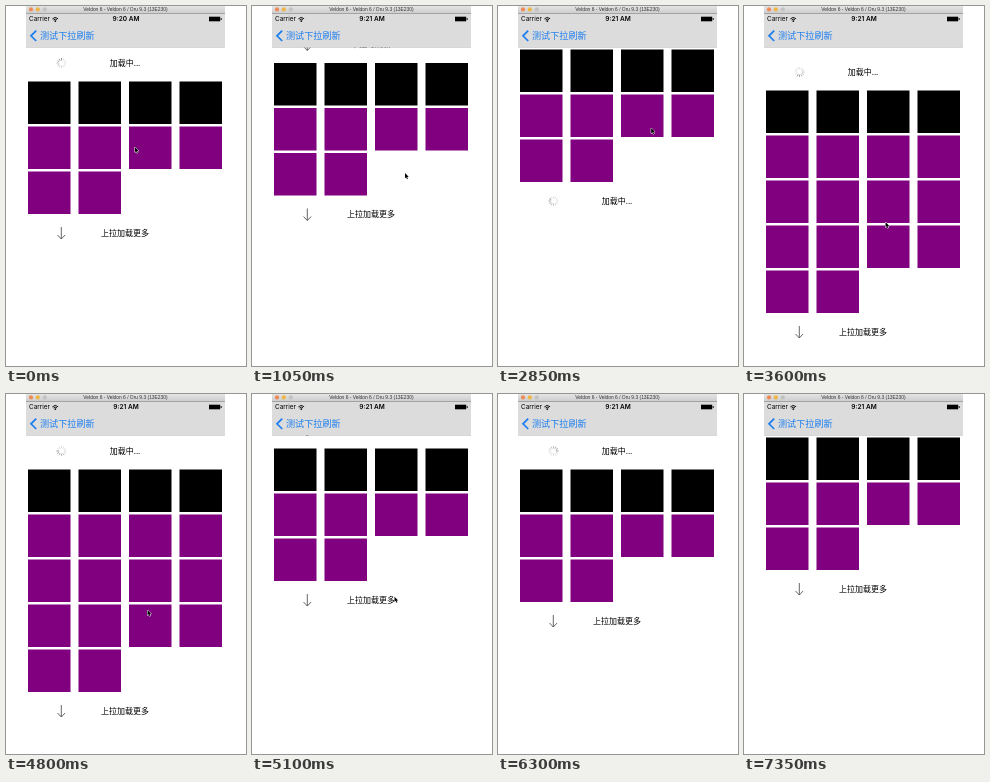
Recreate the animation shown at these times as an HTML page with a canvas. Size 240 by 360 pixels, loop 7500 ms.

```html
<!DOCTYPE html>
<html lang="zh-CN">
<head>
<meta charset="utf-8">
<style>
html, body { margin: 0; width: 100%; height: 100%; overflow: hidden; background: #fff; }
canvas { display: block; width: 240px; height: 360px; }
</style>
</head>
<body>
<canvas id="stage"></canvas>
<script>
const LOOP = 7500, STEP = 150;
const canvas = document.getElementById('stage');
const ctx = canvas.getContext('2d');
const dpr = window.devicePixelRatio || 1;
canvas.width = 240 * dpr;
canvas.height = 360 * dpr;

const CJK = '"Noto Sans CJK SC", "Noto Sans CJK", "Noto Sans", sans-serif';
const LATIN = '"Liberation Sans", sans-serif';
const UI = 'Inter, sans-serif';

// [time, pull distance]
const pullKeys = [
  [0, 32], [900, 32], [1050, 13.5], [1200, 3], [1350, 0], [1500, 0],
  [2100, -22], [2250, -10], [2400, 0], [3000, 0], [3150, 5], [3450, 41],
  [3600, 41], [3750, 35], [3900, 32], [4950, 32], [5100, 11], [5250, 3],
  [5550, 27.5], [5850, 40], [6000, 37], [6150, 32], [6750, 32],
  [6900, 13.5], [7050, 3], [7200, 0]
];
// [time, x, y] of the pointer tip
const pointerKeys = [
  [0, 129, 141], [450, 129, 141], [1050, 153, 167], [1500, 153, 167],
  [2100, 153.2, 122], [2850, 153.2, 122], [3150, 145, 142],
  [3450, 141.5, 216], [4800, 141.5, 216], [5250, 143, 196],
  [5550, 143, 240.5], [5850, 143, 264], [6000, 142, 250], [6300, 100, -12]
];

function at(keys, t, i = 1) {
  const n = keys.findIndex(k => k[0] > t);
  if (n < 0) return keys[keys.length - 1][i];
  const a = keys[n - 1], b = keys[n];
  return a[i] + (b[i] - a[i]) * (t - a[0]) / (b[0] - a[0]);
}

const within = (t, a, b) => t >= a && t < b;

function text(str, x, y, size, family, color = '#000', align = 'center', weight = 400) {
  ctx.font = `${weight} ${size}px ${family}`;
  ctx.textAlign = align;
  ctx.fillStyle = color;
  ctx.fillText(str, x, y + size * 0.37);
}

function line(points, color, width) {
  ctx.beginPath();
  points.forEach(([x, y]) => ctx.lineTo(x, y));
  ctx.strokeStyle = color;
  ctx.lineWidth = width;
  ctx.stroke();
}

function dot(x, y, r, color) {
  ctx.beginPath();
  ctx.arc(x, y, r, 0, Math.PI * 2);
  ctx.fillStyle = color;
  ctx.fill();
}

function arrow(x, y, dir) {
  line([[x, y - 6 * dir], [x, y + 6 * dir]], '#555', 0.9);
  line([[x - 3.8, y + 2 * dir], [x, y + 6 * dir], [x + 3.8, y + 2 * dir]], '#555', 0.9);
}

function spinner(x, y, t) {
  const head = Math.floor(t / 1000 * 12);
  for (let i = 0; i < 12; i++) {
    const a = i * Math.PI / 6 - Math.PI / 2;
    const age = ((head - i) % 12 + 12) % 12;
    const alpha = Math.max(0.2, 0.65 - age * 0.07);
    const c = Math.cos(a), s = Math.sin(a);
    line([[x + c * 2.6, y + s * 2.6], [x + c * 5, y + s * 5]], `rgba(80,80,80,${alpha})`, 0.9);
  }
}

function hint(y, t, loading, label, dir) {
  if (loading) spinner(55.5, y, t);
  else arrow(55.3, y, dir);
  text(loading ? '加载中...' : label, 119, y, 8, CJK);
}

function drawList(t) {
  const pull = at(pullKeys, t);
  const top = 43.5 + pull;
  const rows = within(t, 3000, 4950) ? 5 : 3;
  const refreshing = t < 900 || within(t, 3600, 4950) || within(t, 6000, 6750);
  const fetching = within(t, 2250, 3000);

  ctx.save();
  ctx.beginPath();
  ctx.rect(20, 41, 199, 319);
  ctx.clip();

  const ready = pull > 33;
  hint(top - 18.5, t, refreshing, ready ? '松开立即刷新' : '下拉可刷新', ready ? -1 : 1);

  const count = rows * 4 - 2;
  for (let i = 0; i < count; i++) {
    ctx.fillStyle = i < 4 ? '#000' : '#800080';
    ctx.fillRect(22 + (i % 4) * 50.5, top + Math.floor(i / 4) * 45, 42.5, 42.5);
  }

  const over = pull < -16;
  hint(top + rows * 45 + 16.5, t, fetching, over ? '松开加载更多' : '上拉加载更多', over ? -1 : 1);
  ctx.restore();
}

function drawWifi(x, y) {
  ctx.strokeStyle = '#000';
  ctx.lineWidth = 0.9;
  for (const r of [2.4, 4]) {
    ctx.beginPath();
    ctx.arc(x, y, r, -Math.PI * 0.76, -Math.PI * 0.24);
    ctx.stroke();
  }
  dot(x, y - 0.5, 0.9, '#000');
}

function drawBars(t) {
  ctx.fillStyle = '#dcdcdc';
  ctx.fillRect(20, 7, 199, 34);
  ctx.fillStyle = '#bdbdbd';
  ctx.fillRect(20, 41, 199, 0.6);

  const shade = ctx.createLinearGradient(0, 0, 0, 7);
  shade.addColorStop(0, '#e4e4e4');
  shade.addColorStop(1, '#cecece');
  ctx.fillStyle = shade;
  ctx.fillRect(20, 0, 199, 7);
  ctx.fillStyle = '#8c8c8c';
  ctx.fillRect(20, 7, 199, 0.7);

  dot(25, 3.4, 2.1, '#ee8a58');
  dot(31.8, 3.4, 2.1, '#eeb644');
  dot(38.8, 3.4, 2.1, '#c2c2c2');
  text('Veldon 6 - Veldon 6 / Oru 9.3 (13E230)', 119.5, 3.5, 4.9, LATIN, '#333');

  text('Carrier', 23, 13, 6.4, UI, '#000', 'left');
  drawWifi(49.3, 15.6);
  text(t < 600 ? '9:20 AM' : '9:21 AM', 120, 13, 6.5, UI, '#000', 'center', 600);
  ctx.fillStyle = '#000';
  ctx.fillRect(203, 10.7, 11.2, 4.6);
  ctx.fillRect(214.7, 12, 0.9, 2);

  line([[30.2, 24.6], [25, 29.8], [30.2, 35]], '#1a7df0', 1.7);
  text('测试下拉刷新', 34, 30, 9.1, CJK, '#1a7df0', 'left');
}

function drawPointer(t) {
  if (t >= 6300) return;
  ctx.save();
  ctx.translate(at(pointerKeys, t), at(pointerKeys, t, 2));
  ctx.beginPath();
  [[0, 0], [0, 5.3], [1.2, 4.2], [2, 6.2], [2.9, 5.8], [2.1, 3.9], [3.7, 3.8]]
    .forEach(([x, y]) => ctx.lineTo(x, y));
  ctx.closePath();
  ctx.strokeStyle = '#fff';
  ctx.lineWidth = 1;
  ctx.stroke();
  ctx.fillStyle = '#000';
  ctx.fill();
  ctx.restore();
}

const start = performance.now();

function frame(now) {
  const elapsed = Math.max(0, now - start) % LOOP;
  const t = Math.floor(elapsed / STEP) * STEP;
  ctx.setTransform(dpr, 0, 0, dpr, 0, 0);
  ctx.fillStyle = '#fff';
  ctx.fillRect(0, 0, 240, 360);
  drawList(t);
  drawBars(t);
  drawPointer(t);
  requestAnimationFrame(frame);
}
frame(start);
</script>
</body>
</html>
```
